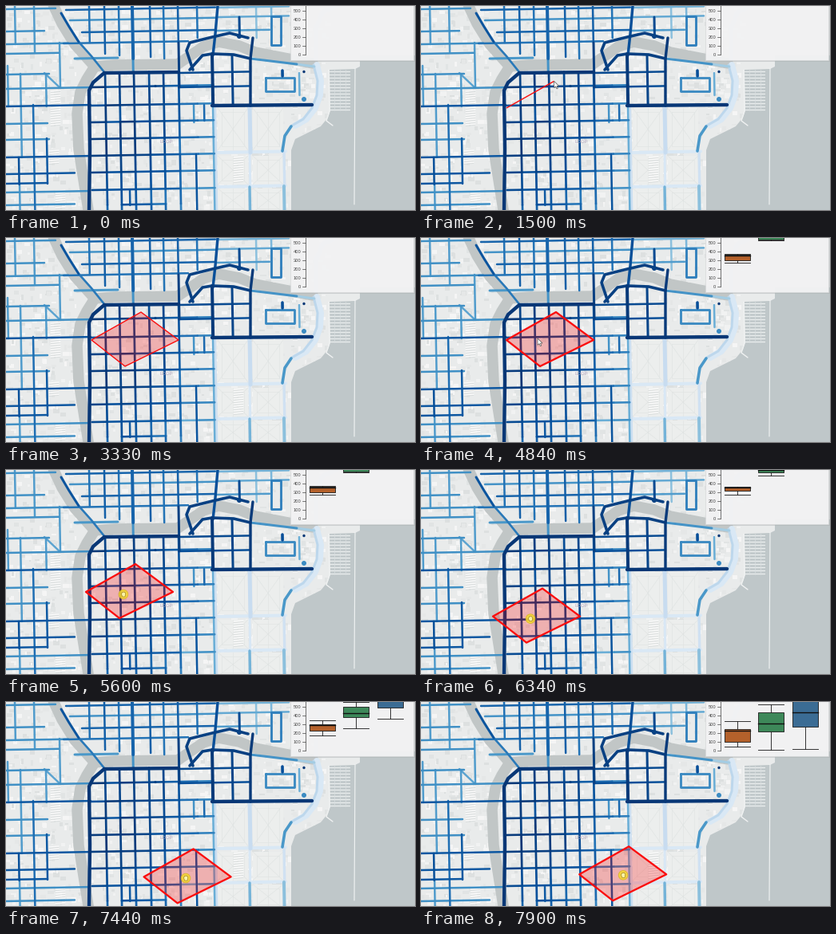
Animation, 512 px wide and 256 px high, one loop 8000 ms. Source, as a matplotlib script:

```python
import numpy as np
import matplotlib
import matplotlib.pyplot as plt
from matplotlib.animation import FuncAnimation
from matplotlib.collections import LineCollection, PolyCollection
from matplotlib.patches import Circle, Polygon, Rectangle

W, H, DPI = 512, 256, 100
PX = 72 / DPI
STEP, LOOP = 40, 8000
TILT = 0.018
BLUES = matplotlib.colormaps["Blues"]
rng = np.random.default_rng(4)

fig = plt.figure(figsize=(W / DPI, H / DPI), dpi=DPI, facecolor="#e9ebeb")
ax = fig.add_axes([0, 0, 1, 1])
ax.set_xlim(0, W)
ax.set_ylim(H, 0)
ax.axis("off")


def lines(paths, color, width, z):
    ax.add_collection(LineCollection(
        paths, colors=color, linewidths=width * PX,
        capstyle="round", joinstyle="round", zorder=z), autolim=False)


def road(level, width, *points):
    lines([points], BLUES(level), width, 4 + level / 10)


def row(level, y, x0, x1, width=2.5):
    road(level, width, (x0, y), (x1, y - (x1 - x0) * TILT))


def col(level, x, y0, y1, width=2.5):
    road(level, width, (x, y0), (x + (y1 - y0) * TILT, y1))


def box(x, y, w, h):
    return [(x, y), (x + w, y), (x + w, y + h), (x, y + h), (x, y)]


def land():
    n = 1300
    parts = zip(rng.uniform(0, 400, n), rng.uniform(0, H, n),
                rng.uniform(2, 8, n), rng.uniform(2, 7, n))
    shades = rng.choice(["#e1e4e4", "#f1f2f2", "#e5e7e7", "#f5f5f5", "#dde0e0"], n)
    ax.add_collection(PolyCollection([box(*p) for p in parts], facecolors=shades,
                                     edgecolors="none", zorder=1), autolim=False)
    for x in (265, 309):
        for y, h in ((128, 53), (188, 36), (229, 30)):
            ax.add_patch(Rectangle((x, y), 38, h, fc="#eceeed", zorder=1.2))
            lines([[(x, y), (x + 38, y + h)], [(x + 38, y), (x, y + h)],
                   [(x + 19, y), (x + 19, y + h)], box(x + 5, y + 5, 28, h - 10)],
                  "#dfe3e2", 0.6, 1.3)
    for x, y0, y1 in ((56, 107, 150), (54, 182, 200), (62, 232, 256), (285, 190, 222)):
        for y in range(y0, y1, 3):
            lines([[(x, y), (x + 12, y - 1)]], "#fafafa", 1.3, 1.4)
            lines([[(x, y + 1.5), (x + 12, y + .5)]], "#d3d7d7", 0.6, 1.4)


def water():
    ax.add_patch(Polygon(
        [(357, H), (357, 181), (362, 167), (394, 151), (403, 140), (406, 131),
         (405, 80), (437, 79), (443, 76), (443, 62), (W, 62), (W, H)],
        fc="#bfc7c9", zorder=2))
    lines([[(56, -8), (70, 22), (86, 48), (111, 76), (101, 92), (93, 108),
            (89, 135), (91, 180), (104, 262)],
           [(110, 76), (135, 74), (215, 73), (247, 51), (266, 45), (292, 50),
            (312, 58), (384, 72)]], "#c1c6c6", 13.5, 2)
    lines([[(437, 78), (436, 249)]], "#eef1f1", 1.2, 2.2)
    lines([[(405, y), (430, y)] for y in range(82, 132, 4)], "#e9eded", 1.4, 2.2)
    lines([[(x, 80), (x, 131)] for x in (411, 418, 425)], "#d9dfe0", 0.7, 2.2)
    lines([[(404, 80), (405, 132), (401, 144), (409, 150)]], "#f0f2f2", 1.4, 2.2)


def west():
    for y, end in ((4, 62), (32, 48), (48, 78), (60, 66), (86, 54), (104, 105),
                   (126, 106), (148, 52), (168, 54), (190, 105), (211, 86),
                   (223, 52), (234, 104), (250, 86)):
        dark = y in (126, 190, 211, 223)
        row(.85 if dark else .63, y, 0, end)
    for x, y0, y1 in ((11, 0, 48), (35, 0, 58), (67, 46, 102), (2, 75, 126),
                      (18, 85, 190), (50, 85, 126), (17, 224, 256)):
        col(.58, x, y0, y1)
    col(.76, 34, 124, 256)
    col(.88, 16, 190, 224)
    col(.84, 51, 166, 223)
    road(.55, 2.4, (48, 84), (68, 103))
    road(.86, 3, (69, 9), (79, 26), (91, 45))
    road(.72, 2.6, (91, 45), (107, 63), (123, 83))


def north():
    ends = ((104, 46), (123, 60), (141, 62), (180, 64), (197, 66), (215, 46), (239, 40))
    for i, (x, end) in enumerate(ends):
        col(.82 - .08 * (i % 2 == 0), x, 0, end)
    col(.80, 158, 0, 66, 4)
    col(.62, 159, 66, 84, 3)
    col(.94, 216, 46, 102, 3)
    for level, y, x in ((.8, 5, 75), (.62, 18, 80), (.8, 33, 95), (.74, 47, 72)):
        row(level, y, x, 228 if y == 47 else 262)
    row(.60, 66, 86, 140, 3)
    road(.88, 3.4, (265, 0), (262, 35), (259, 62))


def east():
    road(.94, 3.6, (303, 40), (280, 34), (258, 39), (230, 46), (226, 56), (234, 80))
    road(.94, 3.6, (230, 80), (246, 62), (258, 60), (285, 61), (306, 66))
    road(.96, 3.4, (309, 40), (306, 66), (306, 125))
    col(.96, 258, 60, 125, 4)
    col(.92, 283, 62, 125, 3)
    row(.90, 84, 216, 306)
    row(.88, 102, 216, 306)
    road(.97, 4.4, (258, 125), (383, 124))
    road(.62, 3, (306, 66), (364, 73))
    road(.36, 3, (364, 73), (386, 76))
    col(.90, 292, 14, 38, 3)
    row(.52, 14, 264, 354)
    row(.58, 31, 262, 330)
    row(.48, 2, 264, 354)
    col(.42, 313, 0, 40)
    col(.46, 332, 0, 13)
    col(.50, 367, 84, 112)
    col(.88, 346, 81, 88, 3.6)
    road(.70, 2.8, *box(332, 13, 12, 36))
    road(.66, 2.8, *box(325, 89.5, 36, 17))


def shore():
    drive = [(389, 74), (394, 94), (393, 112), (387, 128), (376, 142), (362, 150)]
    road(.15, 8, *drive)
    road(.28, 3, *[(x - 4, y) for x, y in drive])
    road(.60, 3.6, (357, 151), (349, 163), (346, 182))
    road(.16, 6, (420, -4), (396, 8), (388, 28), (388, 66))
    col(.22, 261, 125, H, 4)
    col(.24, 305, 126, 184, 5)
    col(.16, 305, 184, 227, 3)
    col(.48, 305, 227, H, 3.4)
    col(.20, 348, 183, 226, 3.4)
    col(.42, 348, 226, H, 4)
    for y in (184, 227):
        row(.15, y, 262, 350, 4)


def downtown():
    """Tilted grid, darkest in the middle and lighter to the east."""
    rows = (84, 102, 125, 146, 167, 188, 209, 231, 250, 262)
    cols = (105, 124, 142, 160, 179, 197, 216, 239, 259)

    def at(x, y):
        return x + (y - 84) * TILT, y - (x - 105) * TILT

    def level(x, y):
        fade = 0.28 * ((x - 105) / 155) ** 3 + 0.1 * max(0, (y - 190) / 66)
        return np.clip(0.97 - fade - rng.exponential(0.035), 0.5, 0.97)

    for y in rows[1:-1]:
        for a, b in zip(cols, cols[1:]):
            if y < 250 or 140 < a < 180:
                road(level(b, y), 2.6, at(a, y), at(b, y))
    for x in cols[1:-2]:
        for a, b in zip(rows, rows[1:]):
            road(level(x, b), 2.7, at(x, a), at(x, b))
    col(.86, 238, 186, H)
    col(.62, 235, 124, 146)
    col(.78, 248, 124, 144)
    col(.50, 259, 125, H)
    col(.84, 155, 231, 250)
    road(.97, 4.4, (104, 258), (105, 180), (104, 106), (109, 96), (123, 84), (216, 83))


def marks():
    for x, y, r, v in ((187, 100.5, 1.6, .93), (292, 38, 3, .93),
                       (373, 82.5, 1.7, .97), (373, 117, 3, .65)):
        ax.add_patch(Circle((x, y), r, fc=BLUES(v), zorder=4.2))
    ax.text(201, 170, "LOOP", fontsize=6 * PX, color="#b3a6bd", family="Liberation Sans",
            ha="center", va="center", zorder=5)


def panel():
    ax.add_patch(Rectangle((357, -4), 154.5, 73.5, fc="#a9afb0", alpha=.45, zorder=6))
    ax.add_patch(Rectangle((356, -4), 154, 72, fc="#f5f5f6", ec="#d4d6d7",
                           lw=.7 * PX, alpha=.92, zorder=6.1))
    lines([[(375, -2), (375, 61)]], "#555555", .8, 7)
    for v in range(0, 600, 100):
        y = 61 - 0.111 * v
        lines([[(371, y), (375, y)]], "#555555", .8, 7)
        ax.text(369.5, y, str(v), fontsize=5.8 * PX, color="#444444", ha="right",
                va="center_baseline", family="Liberation Sans", zorder=7)


def merge_lines():
    """Fold the many one-line collections into one per layer, for speed."""
    layers = {}
    for c in list(ax.collections):
        if isinstance(c, LineCollection):
            layers.setdefault(round(c.get_zorder(), 3), []).append(c)
    for z, group in layers.items():
        paths, colors, widths = [], [], []
        for c in group:
            for seg in c.get_segments():
                paths.append(seg)
                colors.append(c.get_colors()[0])
                widths.append(c.get_linewidths()[0])
            c.remove()
        ax.add_collection(LineCollection(paths, colors=colors, linewidths=widths, zorder=z,
                                         capstyle="round", joinstyle="round"), autolim=False)


for draw in (land, water, shore, west, north, east, downtown, marks, panel, merge_lines):
    draw()


# ---- moving parts ----
def track(keys, t):
    k = np.array(keys, float)
    return np.array([np.interp(t, k[:, 0], c) for c in k.T[1:]])


CORNERS = np.array([(107, 128), (169, 93), (216, 128), (149, 161)], float)
A, B, C, D = CORNERS
REST, GRAB = (146, 126), (154, 131)
CURSOR = [(100, 335, 270), (820, *A), (980, *A), (1500, *B), (1740, *B), (2120, *C),
          (2200, *C), (2510, 150, 158), (2790, *D), (3060, *D), (3100, *A), (3850, *A),
          (3990, 143, 127), (4190, *REST), (4980, *REST), (5220, *GRAB)]
SHIFT = [(5340, 0, 0), (5600, -7, 25), (6170, -17, 53), (6340, -17, 56),
         (6480, -17, 56), (7080, 19, 79), (7260, 47, 89), (7560, 78, 93),
         (7900, 92, 88)]
DRIFT = [(6480, 0, 0), (7900, 8, -2)]

# Each key: time, upper whisker, box top, median, box bottom, lower whisker.
PLOTS = [
    (396, "#b4612b", 3500, [(5640, 20, 21, 22, 28, 31), (7080, 22, 22.5, 23, 24, 30.5),
                            (7900, 24, 34, 36.5, 51, 57)]),
    (438, "#3d8859", 3500, [(5640, -8, -6, -3, 2, 3), (7080, -3, 1, 2.5, 4, 11),
                            (7900, 3, 13, 28, 38, 61)]),
    (481, "#3b6c94", 7340, [(7340, -20, -18, -6, 2, 12), (7900, -20, -10, 14, 32, 61)]),
]

patch = ax.add_patch(Polygon(CORNERS, fc=(1, 0, 0, .25), ec="#fb0d0d",
                             joinstyle="round", zorder=8))
glow = ax.add_patch(Circle((0, 0), 5.8, fc="#f3d633", ec="#d9b81f", lw=.6,
                           alpha=.88, zorder=9))
ARROW = np.array([(0, 0), (0, 8.4), (2, 6.6), (3.4, 9.6), (4.7, 9), (3.4, 6.1), (6, 6)])
HAND = np.array([(-2.6, -.6), (-1.2, -2.8), (1.6, -2.8), (2.8, -1), (2, 3), (-1.4, 3)])
pointer = ax.add_patch(Polygon(ARROW, lw=.7 * PX, zorder=10))

plots = []
for cx, color, start, keys in PLOTS:
    body = ax.add_patch(Rectangle((cx - 16, 0), 32, 1, fc=color, ec="#222222",
                                  lw=.9 * PX, zorder=8))
    whisk, = ax.plot([], [], color="#222222", lw=.9 * PX, zorder=8)
    mid, = ax.plot([], [], color="#111111", lw=1.4 * PX, zorder=8.1)
    plots.append((cx, start, keys, body, whisk, mid))
ax.set_xlim(0, W)
ax.set_ylim(H, 0)


def set_patch(t, tip):
    patch.set_visible(t >= 1020)
    if t < 2790:
        done = 1 if t < 1500 else 2 if t < 2160 else 3
        patch.set_xy([*CORNERS[:done], tip])
    else:
        patch.set_xy(CORNERS + track(SHIFT, t))
    patch.set_linewidth((2.3 if t >= 4840 else 1.4) * PX)


def set_pointer(t, tip):
    drag = t >= 5200
    glow.set_visible(drag)
    glow.center = tip
    pointer.set_visible(not 3070 <= t < 3680)
    pointer.set_xy((HAND if drag else ARROW) + tip)
    pointer.set_facecolor("#fbf3a8" if drag else "white")
    pointer.set_edgecolor("#a58a1c" if drag else "#555555")


def set_plot(t, cx, start, keys, body, whisk, mid):
    for artist in (body, whisk, mid):
        artist.set_visible(t >= start)
    hi, top, med, low, end = track(keys, t)
    l, r, gap = cx - 16, cx + 16, np.nan
    body.set_y(top)
    body.set_height(low - top)
    whisk.set_data([l, r, gap, cx, cx, gap, cx, cx, gap, l, r],
                   [hi, hi, gap, hi, top, gap, low, end, gap, end, end])
    mid.set_data([l, r], [med, med])


def update(i):
    t = i * STEP
    tip = track(CURSOR, t) + track(SHIFT, t) + track(DRIFT, t)
    set_patch(t, tip)
    set_pointer(t, tip)
    for p in plots:
        set_plot(t, *p)
    return []


anim = FuncAnimation(fig, update, frames=LOOP // STEP, interval=STEP,
                     init_func=lambda: update(0), repeat=True, repeat_delay=0, blit=False)
plt.show()
```
